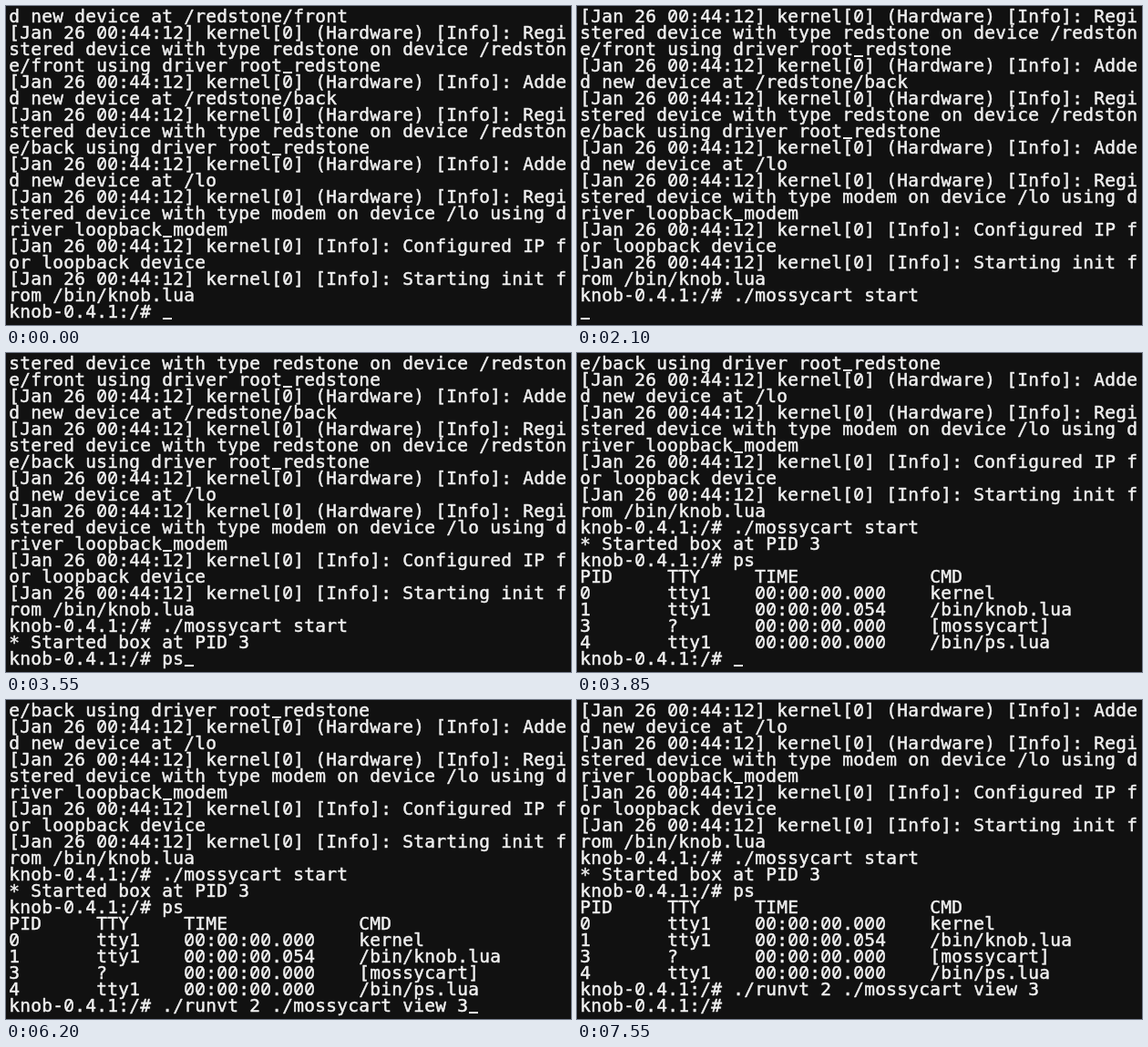
An HTML page with a canvas for the animation above (8000 ms loop, 620x350 px).

```html
<!DOCTYPE html>
<html lang="en">
<head>
<meta charset="utf-8">
<title>Terminal session</title>
<style>
  html, body { margin: 0; width: 100%; height: 100%; overflow: hidden; background: #111; }
  canvas { display: block; }
</style>
</head>
<body>
<canvas id="screen" width="620" height="350"></canvas>
<script>
const ctx = document.getElementById('screen').getContext('2d');

const LOOP = 8000, BLINK = 450, BLINK_SHIFT = 100;
const COLS = 51, ROWS = 19, CELL_W = 12, CELL_H = 18, PAD = 4, BASELINE = 14;
const BACK = '#111111', INK = '#f0f0f0', EXTRA_WEIGHT = 0.5;
const FONT = '19.5px "DejaVu Sans Mono", monospace';
const ZERO_FONT = '19.5px "Noto Sans Mono", monospace'; // slashed zero

const PROMPT = 'knob-0.4.1:/# ';
const START = './mossycart start';
const VIEW = './runvt 2 ./mossycart view 3';

const kernel = text => '[Jan 26 00:44:12] kernel[0] ' + text;
const hardware = text => kernel('(Hardware) [Info]: ' + text);
const added = path => hardware(`Added new device at ${path}`);
const registered = (type, path, driver) =>
  hardware(`Registered device with type ${type} on device ${path} using driver ${driver}`);
const processRow = (pid, tty, time, cmd) =>
  pid.padEnd(8) + tty.padEnd(8) + time.padEnd(16) + cmd;

const boot = [
  added('/redstone/front'),
  registered('redstone', '/redstone/front', 'root_redstone'),
  added('/redstone/back'),
  registered('redstone', '/redstone/back', 'root_redstone'),
  added('/lo'),
  registered('modem', '/lo', 'loopback_modem'),
  kernel('[Info]: Configured IP for loopback device'),
  kernel('[Info]: Starting init from /bin/knob.lua')
];
const launching = [...boot, PROMPT + START];
const started = [...launching, '* Started box at PID 3'];
const listed = [
  ...started,
  PROMPT + 'ps',
  processRow('PID', 'TTY', 'TIME', 'CMD'),
  processRow('0', 'tty1', '00:00:00.000', 'kernel'),
  processRow('1', 'tty1', '00:00:00.054', '/bin/knob.lua'),
  processRow('3', '?', '00:00:00.000', '[mossycart]'),
  processRow('4', 'tty1', '00:00:00.000', '/bin/ps.lua')
];
const viewed = [...listed, PROMPT + VIEW];

// Each step: start time, finished output, line being edited
const steps = [
  [0, boot, PROMPT],
  [550, boot, PROMPT + VIEW],
  [800, boot, PROMPT + START],
  [1150, boot, PROMPT + 'ps'],
  [1550, boot, PROMPT + START],
  [2100, launching, ''],
  [2200, started, PROMPT],
  [3450, started, PROMPT + 'p'],
  [3550, started, PROMPT + 'ps'],
  [3850, listed, PROMPT],
  [4750, listed, PROMPT + 'ps'],
  [5000, listed, PROMPT + START],
  [5450, listed, PROMPT + VIEW],
  [6450, viewed, PROMPT]
];

function wrap(line) {
  const rows = [];
  for (let i = 0; i === 0 || i < line.length; i += COLS) rows.push(line.slice(i, i + COLS));
  return rows;
}

function drawCell(char, col, row) {
  const x = PAD + col * CELL_W, y = PAD + row * CELL_H + BASELINE;
  if (char === '_') {
    ctx.fillRect(x, y, 10, 2);
  } else if (char !== ' ') {
    ctx.font = char === '0' ? ZERO_FONT : FONT;
    ctx.fillText(char, x + 5, y);
    ctx.strokeText(char, x + 5, y);
  }
}

function draw(time) {
  const [, output, input] = steps.findLast(step => step[0] <= time);
  const cursorOn = Math.floor((time + BLINK_SHIFT) / BLINK) % 2 === 0;
  const rows = [...output, input + (cursorOn ? '_' : '')].flatMap(wrap).slice(-ROWS);

  ctx.fillStyle = BACK;
  ctx.fillRect(0, 0, 620, 350);
  ctx.fillStyle = ctx.strokeStyle = INK;
  ctx.lineWidth = EXTRA_WEIGHT;
  ctx.lineJoin = 'round';
  ctx.textAlign = 'center';
  rows.forEach((line, row) => [...line].forEach((char, col) => drawCell(char, col, row)));
}

const origin = performance.now();
function tick() {
  draw((performance.now() - origin) % LOOP);
  requestAnimationFrame(tick);
}
tick();
</script>
</body>
</html>
```
